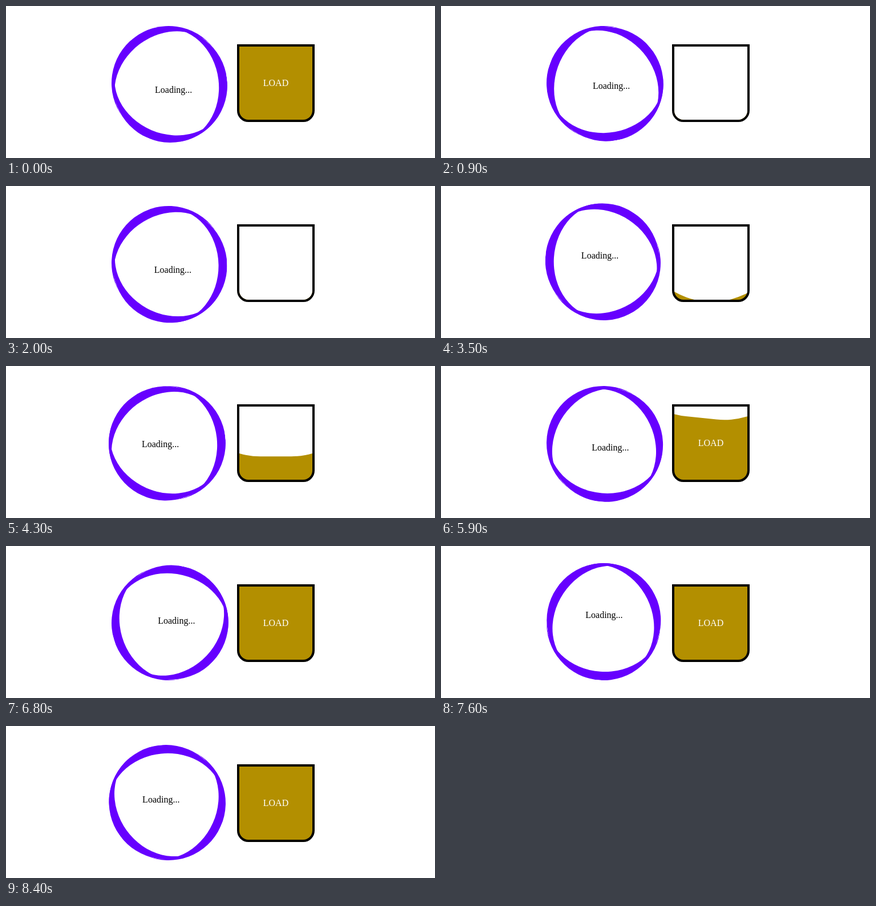
Animation, 752 px wide and 266 px high, one loop 8.5 s. Source, as an HTML page:

```html
<!DOCTYPE html>
<html lang="en">
<head>
<meta charset="utf-8">
<title>Loading</title>
<style>
  html, body { margin: 0; width: 100%; height: 100%; overflow: hidden; background: #fff; }
  body { position: relative; font: 16px/20px "Liberation Serif", "Times New Roman", serif; }
  #rotor, #label { position: absolute; left: 285px; top: 135px; width: 0; height: 0; }
  #rotor i {
    position: absolute; left: -100px; top: -100px; width: 200px; height: 200px;
    box-sizing: border-box; border-radius: 50%; border-bottom: 15px solid #60f;
  }
  #rotor i:nth-child(1) { transform: rotate(90deg); }
  #rotor i:nth-child(2) { transform: translateX(5px) rotate(-30deg); }
  #rotor i:nth-child(3) { transform: translateX(5px) rotate(-150deg); }
  #label span { position: absolute; left: -50px; top: -10px; width: 100px; text-align: center; }
  #tank {
    position: absolute; left: 405px; top: 67px; width: 128px; height: 128px;
    border: 4px solid #000; border-radius: 0 0 20px 20px; overflow: hidden; background: #b38f00;
  }
  #cover {
    position: absolute; left: -96px; top: -160px; width: 320px; height: 320px;
    border-radius: 41.6%; background: #fff;
  }
  #tank span { position: absolute; inset: 0; line-height: 128px; text-align: center; color: #fff; }
</style>
</head>
<body>
<div id="rotor"><i></i><i></i><i></i></div>
<div id="label"><span>Loading...</span></div>
<div id="tank"><div id="cover"></div><span>LOAD</span></div>
<script>
  const LOOP = 8500, STEP = 100, ORBIT = 14.5;
  const DRAIN_AT = 0.5; // the full tank empties at once here
  const [rotor, label, cover] = ["rotor", "label", "cover"].map(id => document.getElementById(id));

  function draw(t) {
    // one turn per second, with a slight lead that resets every six seconds
    const angle = 53 + 360 * t + 3 * (t % 6);
    const rad = angle * Math.PI / 180;
    rotor.style.transform = `rotate(${angle}deg)`;
    label.style.transform = `translate(${ORBIT * Math.cos(rad)}px, ${ORBIT * Math.sin(rad)}px)`;

    // a turning rounded square rises and uncovers the tank
    const rise = t < DRAIN_AT ? t + LOOP / 1000 : t;
    const y = -39.5 - 41.6 * (rise - 3.5);
    cover.style.transform = `translateY(${y}px) rotate(${42 + 60 * (rise - 3.5)}deg)`;
  }

  const start = performance.now();
  function tick() {
    const ms = (performance.now() - start) % LOOP;
    draw(Math.floor(ms / STEP) * STEP / 1000);
    requestAnimationFrame(tick);
  }
  tick();
</script>
</body>
</html>
```
